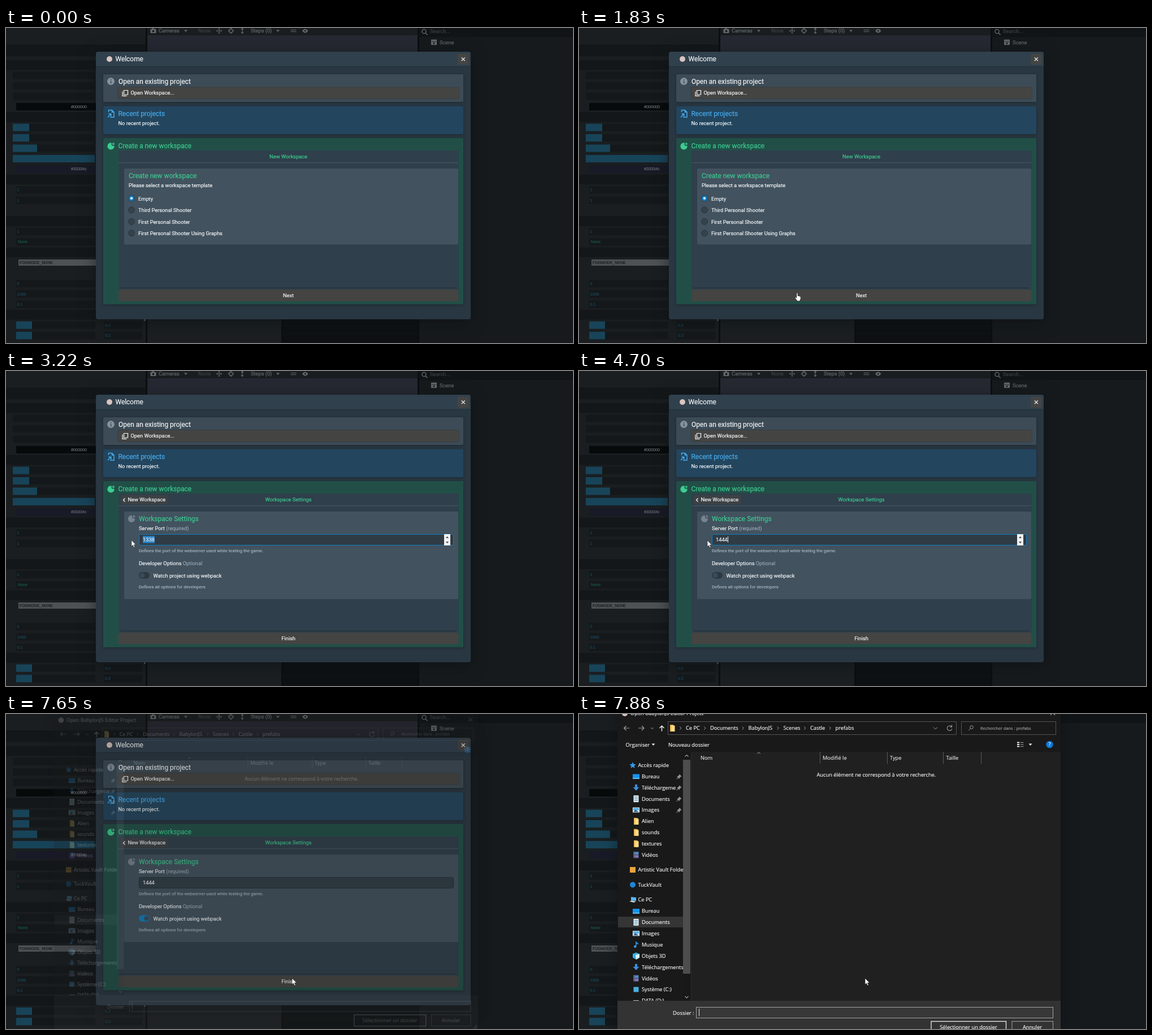
Animation, 1003 px wide and 558 px high, one loop 8000 ms. Source, as an HTML page:

```html
<!DOCTYPE html>
<html lang="en">
<head>
<meta charset="utf-8">
<title>Workspace wizard</title>
<style>
html, body { margin: 0; width: 100%; height: 100%; overflow: hidden; background: #151a1c; }
svg { display: block; width: 100vw; height: 100vh; font-family: Roboto, sans-serif; }
text { white-space: pre; }
.gui { font-family: "Liberation Sans", Arial, sans-serif; }
#picker text { font-family: "Open Sans", "Noto Sans", sans-serif; }
.lift { filter: drop-shadow(0 1px 2px rgba(16,22,26,.5)); }
.modal { filter: drop-shadow(0 6px 14px rgba(10,14,17,.55)); }
</style>
</head>
<body>
<svg id="stage" viewBox="0 0 1003 558" preserveAspectRatio="none"></svg>
<script>
const LOOP = 8000;
const H = 11.93, B = 9.28, S = 7.96, G = 7.2, W = 9.28;   // text sizes
const WHITE = '#f5f8fa', GREEN = '#3dcc91', BLUE = '#48aff0', MUTED = '#a7b6c2', BTN = '#444443', LOGO = '#d8c4c0';

const rect = (x, y, x2, y2, fill, more = '') =>
  `<rect x="${x}" y="${y}" width="${x2 - x}" height="${y2 - y}" fill="${fill}" ${more}/>`;
// the hairline stroke gives the slightly heavier look of screen text
const text = (x, y, s, size, fill = WHITE, more = '') =>
  `<text x="${x}" y="${y + size * .36}" font-size="${size}" fill="${fill}" stroke="${fill}" stroke-width=".18" ${more}>${s}</text>`;
const muted = s => `<tspan fill="${MUTED}" stroke="none">${s}</tspan>`;
const mid = (x, y, s, size, fill) => text(x, y, s, size, fill, 'text-anchor="middle"');
const line = (d, stroke, w = 1, more = '') =>
  `<path d="${d}" fill="none" stroke="${stroke}" stroke-width="${w}" ${more}/>`;
const shape = (d, fill, more = '') => `<path d="${d}" fill="${fill}" ${more}/>`;
const dot = (x, y, r, fill, more = '') => `<circle cx="${x}" cy="${y}" r="${r}" fill="${fill}" ${more}/>`;
const group = (id, body, more = '') => `<g id="${id}" ${more}>${body}</g>`;
const caretDown = (x, y, fill) => shape(`M${x - 3} ${y - 1.5}h6l-3 3.5z`, fill);
const chevron = (x, y, c) => line(`M${x - 1.3} ${y - 2.7}l2.7 2.7l-2.7 2.7`, c);

// ---- editor behind the dialog
function inspector() {
  const rowY = k => 84 + k * 18.43;
  const field = (k, x, x2, fill = '#14181a') => rect(x, rowY(k) - 6.6, x2, rowY(k) + 6.6, fill);
  const label = (k, x, s, c = '#1a4a5e', size = G) => text(x, rowY(k), s, size, c, 'class="gui"');
  let s = rect(0, 0, 247, 558, '#1a1e20') + rect(0, 29, 247, 50, '#131719');
  for (const k of [-1, 4, 10, 14, 17, 23]) s += rect(0, rowY(k) - 8.7, 247, rowY(k) + 8.7, '#131719');
  for (const k of [0, 1, 2, 5, 6, 7, 8]) s += field(k, 12, 157);
  for (const k of [11, 12, 15, 16, 20, 21, 22, 24, 25]) s += field(k, 18, 158);
  s += field(3, 18, 159, '#070a0b') + label(3, 115, '#000000', '#6b6f71');
  s += field(9, 18, 159, '#181a27') + label(9, 115, '#33334c', '#6b6f71');
  [[5, 41], [6, 41], [7, 55], [8, 157]].forEach(([k, x]) => s += field(k, 12, x, '#184459'));
  [[11, '1'], [12, '1'], [15, '1'], [20, '0'], [21, '1000'], [22, '0.1']].forEach(([k, v]) => s += label(k, 19.5, v));
  s += label(16, 21, 'None', '#1a5a48');
  s += rect(22, 410, 160, 421, '#4e5254') + label(18, 24, 'FOGMODE_NONE', '#171b1d', 6.85);
  for (const k of [24, 25]) s += field(k, 18, 46, '#184459') + field(k, 173, 241) + label(k, 175, '0.2');
  return s + rect(244, 515, 247, 519, '#565a5c');
}

function editor() {
  const c = '#64696c', dim = '#3c4144';
  let s = rect(0, 0, 1003, 558, '#0c0f11') + inspector();
  s += rect(250, 0, 728, 13, '#191d1f') + rect(250, 13, 728, 510, '#262832');
  s += rect(250, 510, 487, 558, '#1b1f22') + rect(490, 510, 728, 558, '#0d1113');
  s += rect(731, 0, 1003, 558, '#161a1d') + rect(731, 0, 1003, 16, '#101417');
  s += rect(255.5, 2, 265.5, 9, c, 'rx="1"') + rect(258, .5, 262, 2, c) + dot(260.5, 5.5, 2, '#191d1f');
  s += text(270, 4.5, 'Cameras', B, c) + caretDown(318, 5, c) + text(340, 4.5, 'None', B, dim);
  s += line('M372.5 5h9M377 .5v9M374 3.5l-1.6 1.5l1.6 1.5M380 3.5l1.6 1.5l-1.6 1.5M375.5 2l1.5-1.6l1.5 1.6M375.5 8l1.5 1.6l1.5-1.6', c);
  s += dot(398, 5, 3.6, 'none', `stroke="${c}" stroke-width="1.2"`) + line('M392.5 5h4M399.5 5h4M398 0v3.5M398 6.5v3.5', c, 1.2);
  s += line('M418 .5v9M416 2.5l2-2l2 2M416 7.5l2 2l2-2', c, 1.2);
  s += text(433, 4.5, 'Steps (0)', B, c) + caretDown(481, 5, c) + line('M503.5 3.5h10M503.5 6.5h10', c);
  s += shape('M524 5q5-7 10.5 0q-5.5 7-10.5 0z', c) + dot(529.2, 5, 1.6, '#191d1f');
  s += dot(739.5, 6, 3.6, 'none', `stroke="${c}" stroke-width="1.3"`) + line('M742 8.7l3.5 3.5', c, 1.6);
  s += text(750, 6, 'Search...', B, dim);
  s += rect(752, 22, 762, 30, c, 'rx=".8"') + rect(752, 20.5, 762, 23, c) + line('M753 24h8', '#161a1d', .8) + dot(757, 27, 1.5, '#161a1d');
  return s + text(767, 25.5, 'Scene', B, c);
}

// ---- welcome dialog
const globe = (x, y, c, bg) => dot(x, y + .4, 6.1, c) + dot(x + 4.3, y - 3.6, 3.4, bg) +
  line(`M${x + 4.3} ${y - 6.2}v5M${x + 1.8} ${y - 3.7}h5`, c, 1.3);

function welcome() {
  let s = rect(159, 42, 822, 516, '#293742', 'rx="4" class="modal"');
  s += shape('M159 68v-22q0-4 4-4h655q4 0 4 4v22z', '#30404d') + line('M159 68.4h663', '#222d36', .9);
  s += dot(183, 55, 5, LOGO) + text(193.5, 54.5, 'Welcome', H);
  s += rect(799, 45.5, 818.5, 65, BTN, 'rx="2"') + line('M805.8 52.2l6 6M811.8 52.2l-6 6', '#d5dce1', 1.5);

  s += rect(172, 82, 809, 131, '#3c4b56', 'rx="2" class="lift"') + dot(185.5, 94.5, 6.4, '#8593a0');
  s += rect(184.8, 93.5, 186.4, 98.3, '#3c4b56') + rect(184.8, 90.7, 186.4, 92.3, '#3c4b56');
  s += text(199, 94.5, 'Open an existing project', H) + rect(198, 104.5, 801.5, 125.5, BTN, 'rx="2" stroke="#333b40" stroke-width=".7"');
  s += line('M208.5 110.5h7v7.5h-7z', WHITE, 1.2) + line('M206 112.5v7.8h7.5', WHITE, 1.2);
  s += text(220.5, 114.8, 'Open Workspace...', B);

  s += rect(172, 138.5, 809, 188, '#23455e', 'rx="2" class="lift"');
  s += line('M181.5 149v-3.5h6l3.5 3.5v9h-7M187.5 145.5v3.5h3.5', BLUE, 1.4) + line('M180 158l5.5-5.5M181.5 152.3h4.2v4.2', BLUE, 1.5);
  s += text(198.5, 151.8, 'Recent projects', H, BLUE) + text(198.5, 168.4, 'No recent project.', B);

  s += rect(172, 195, 809, 489.5, '#214f47', 'rx="2" class="lift"') + globe(185.5, 209, GREEN, '#214f47');
  s += text(198.5, 208.7, 'Create a new workspace', H, GREEN);
  s += rect(199, 217, 800.5, 484, '#2f3f4b') + line('M199 238.7h601', '#4a5a66', 1);
  s += line('M203 460.5h594', '#212b33', 1) + rect(199, 463.5, 800.5, 484, BTN, 'rx="2"');
  return s + pageOne() + pageTwo();
}

function pageOne() {
  let s = mid(499.5, 228, 'New Workspace', B, GREEN) + rect(209, 249, 800, 383.5, '#42525f', 'rx="2"');
  s += text(217, 261.7, 'Create new workspace', H, GREEN) + text(217, 278.5, 'Please select a workspace template', B);
  ['Empty', 'Third Personal Shooter', 'First Personal Shooter', 'First Personal Shooter Using Graphs'].forEach((name, i) => {
    const y = 301.7 + i * 20.55;
    s += dot(222, y, 5.5, i ? '#34424d' : '#137cbd', 'stroke="#25313a" stroke-width=".8"');
    if (!i) s += dot(222, y, 2.1, '#fff');
    s += text(234, y + .5, name, B);
  });
  return group('one', s + mid(499.5, 474, 'Next', B));
}

function pageTwo() {
  let s = rect(203, 220, 287, 236.5, '#3c4144', 'rx="2"') + line('M210.5 225.5l-3 3l3 3', WHITE, 1.3);
  s += text(215.5, 228, 'New Workspace', B) + mid(499.5, 228, 'Workspace Settings', B, GREEN);
  s += rect(209, 249, 800, 404, '#42525f', 'rx="2"') + globe(222, 261.5, '#75848f', '#42525f');
  s += text(235, 261.7, 'Workspace Settings', H, GREEN);
  s += text(235, 278.7, 'Server Port ' + muted('(required)'), B);
  s += rect(235.5, 289.5, 791.5, 308.5, '#2f3c46', 'id="field" rx="2"') + rect(242, 292, 242, 305, '#2a7fc0', 'id="marked"');
  s += text(242, 298.5, '', B, WHITE, 'id="port"') + rect(0, 293, .9, 304, WHITE, 'id="caret"');
  s += group('spin', rect(775, 289, 786, 309, '#f2f2f2') + shape('M778 296h5l-2.5-3zM778 302.2h5l-2.5 3z', '#444'));
  s += text(235, 318.3, 'Defines the port of the webserver used while testing the game.', S, MUTED);
  s += text(235, 341, 'Developer Options ' + muted('Optional'), B);
  s += rect(235, 356.2, 254, 367.8, '#2c3943', 'id="pill" rx="5.8"') + dot(241, 362, 4.3, '#3b4b58', 'id="knob"');
  s += text(260.5, 362.7, 'Watch project using webpack', B) + text(235, 382.3, 'Defines all options for developers', S, MUTED);
  return group('two', s + mid(499.5, 474, 'Finish', B));
}

// ---- folder picker
const icons = {
  star: (x, y) => shape(`M${x} ${y - 5.5}l1.6 3.8l4 .4l-3 2.7l.9 4l-3.5-2.1l-3.5 2.1l.9-4l-3-2.7l4-.4z`, '#2f9bf0'),
  desk: (x, y) => rect(x - 6, y - 4, x + 6, y + 4.5, '#1493ec') + rect(x - 6, y + 3, x + 6, y + 4.5, '#7cc8ff'),
  down: (x, y) => shape(`M${x - 2} ${y - 5.5}h4v5h3.5l-5.5 6l-5.5-6h3.5z`, '#3b8fe0'),
  doc: (x, y) => rect(x - 4.5, y - 6, x + 4.5, y + 6, '#e8eef2') + line(`M${x - 3} ${y - 3}h6M${x - 3} ${y}h6M${x - 3} ${y + 3}h6`, '#4f97c4', 1.2),
  pic: (x, y) => rect(x - 6, y - 4.5, x + 6, y + 4.5, '#e4edf3') + rect(x - 5, y - 3.5, x + 5, y + .5, '#55aee6') + shape(`M${x - 5} ${y + 3.5}l3.5-4l3 2l3.5 2z`, '#34577c'),
  folder: (x, y) => shape(`M${x - 4} ${y - 6}h5l3 1.5v10.5h-8z`, '#e9bb58') + rect(x - 1.5, y - 4, x + 4.5, y + 6, '#ffdc86'),
  film: (x, y) => rect(x - 5, y - 6, x + 5, y + 6, '#37404b') + rect(x - 2.5, y - 5, x + 4, y - .5, '#4b8fd6') + rect(x - 2.5, y + .5, x + 4, y + 5, '#8a6fc0') + line(`M${x - 3.8} ${y - 5}v10`, '#cfd6dd', 1, 'stroke-dasharray="1.2 1.2"'),
  pc: (x, y) => shape(`M${x - 3} ${y - 5}l9 1v6l-9-.5z`, '#58b7f2') + shape(`M${x - 6} ${y + 3}l4-1.5l8 1.5l-4 2z`, '#c8d3da'),
  note: (x, y) => line(`M${x} ${y + 3}v-8q1 3 4 4`, '#2f9bf0', 1.6) + dot(x - 1.8, y + 3.4, 2.2, '#2f9bf0'),
  cube: (x, y) => shape(`M${x - 6} ${y - 3.5}l6-2.5l6 2.5v6.5l-6 3.5l-6-3.5z`, '#38b0e4') + shape(`M${x - 1} ${y - 1.5}l7-2v6.5l-6 3.5z`, '#d9f1fb'),
  round: (x, y) => dot(x, y, 5, '#1c86d8'),
  square: (x, y) => rect(x - 5, y - 5, x + 5, y + 5, '#e8a33d'),
  disk: (x, y) => rect(x - 4.5, y - 4.5, x + 4.5, y + 4.5, '#4aaee0'),
  drive: (x, y) => rect(x - 5, y - 1, x + 5, y + 4, '#b8bec3')
};

const places = [
  ['star', 'Accès rapide', 90.5, 0], ['desk', 'Bureau', 110.5, 1], ['down', 'Téléchargeme', 130.3, 1], ['doc', 'Documents', 150.2, 1],
  ['pic', 'Images', 170, 1], ['folder', 'Alien', 190, 1], ['folder', 'sounds', 209.8, 1], ['folder', 'textures', 229.7, 1],
  ['film', 'Vidéos', 249.5, 1], ['square', 'Artistic Vault Folders', 276, 0], ['round', 'TuckVault', 302.5, 0], ['pc', 'Ce PC', 329, 0],
  ['desk', 'Bureau', 349, 1], ['doc', 'Documents', 368.8, 1], ['pic', 'Images', 388.7, 1], ['note', 'Musique', 408.5, 1],
  ['cube', 'Objets 3D', 428.4, 1], ['down', 'Téléchargements', 448.3, 1], ['film', 'Vidéos', 468.2, 1],
  ['disk', 'Système (C:)', 488, 1], ['drive', 'DATA (D:)', 508, 1]
];

function picker() {
  const c = '#f4f4f4', grey = '#a0a0a0';
  let s = rect(68, -18, 852, 572, '#191919', 'class="modal"') + rect(199, 67, 852, 508, '#202020');
  s += dot(81, -1, 5, LOGO) + text(91, -1, 'Open BabylonJS Editor Project', W, c) + line('M834 -6l8 8M842 -6l-8 8', c);
  s += line('M89.5 25h-10M83.5 21l-4 4l4 4M105 25h10M111 21l4 4l-4 4', grey, 1.2) + line('M127 24l2.5 2.5l2.5-2.5', grey);
  s += line('M146.5 30.5v-9.5M142.5 25l4-4l4 4', c, 1.4);
  s += rect(157.5, 13.5, 667.5, 36.5, '#191919', 'stroke="#535353"') + icons.folder(165, 25);
  [['Ce PC', 189], ['Documents', 232], ['BabylonJS', 299.5], ['Scenes', 361.5], ['Castle', 409], ['prefabs', 453.5]]
    .forEach(([name, x]) => s += chevron(x - 9.5, 25, grey) + text(x, 25, name, W, c));
  s += line('M627 23.5l3.5 3.5l3.5-3.5', grey) + line('M659 22.5a4.3 4.3 0 1 0 .8 3.5M659.5 19.5v3.5h-3.5', grey, 1.1);
  s += rect(676.5, 13.5, 843.5, 36.5, '#191919', 'stroke="#535353"') + dot(694.5, 23.5, 2.8, 'none', `stroke="${grey}"`) + line('M692.5 25.5l-3 3.5', grey);
  s += text(710, 25, 'Rechercher dans : prefabs', 7.4, grey);
  s += group('tools', text(82.5, 54.5, 'Organiser', W, c) + caretDown(131.5, 54, c) + text(158, 54.5, 'Nouveau dossier', W, c) +
    line('M775 50.5h4M775 54h4M775 57.5h4', c, 2) + line('M780.5 50.5h6M780.5 54h6M780.5 57.5h6', grey) + caretDown(798.5, 54, c));
  s += dot(832.5, 54, 6.3, '#0f78d4') + mid(832.5, 54, '?', 9, '#fff');
  [426, 545, 644, 711].forEach(x => s += line(`M${x}.5 67v21`, '#5a5a5a'));
  [['Nom', 215], ['Modifié le', 431], ['Type', 550], ['Taille', 649.5]].forEach(([name, x]) => s += text(x, 78, name, W, '#dedede'));
  s += line('M315 70.5l3-2.5l3 2.5', grey) + text(420.5, 108, 'Aucun élément ne correspond à votre recherche.', W, c);

  s += rect(69, 359, 184, 378, '#353535');
  let list = '';
  for (const [kind, name, y, deep] of places)
    list += icons[kind](deep ? 101 : 95, y) + text(deep ? 111 : 104.5, y, name, W, c);
  s += `<g clip-path="url(#side)">${list}</g>` + rect(171, 122, 184, 139, '#191919');
  for (const y of [110.5, 130.3, 150.2, 170])
    s += shape(`M177.5 ${y - 4}l4 4l-1.5 .4l-2 2l-.4 2l-2-2l-2.8 2.8l-.6-.6l2.8-2.8l-1.8-1.8l2-.6l2-2z`, '#8f979d');
  s += rect(184, 67, 198, 508, '#181818') + rect(184, 81, 197, 460, '#4d4d4d') + line('M198.5 67v441', '#2d2d2d');
  s += line('M187.5 75.5l3-3l3 3M187.5 500l3 3l3-3', grey, 1.2);

  s += rect(68, 508, 852, 572, '#333') + text(203.5, 529.5, 'Dossier :', W, c, 'text-anchor="end"');
  s += rect(207.5, 519.5, 838.5, 538.5, '#383838', 'stroke="#a3a3a3"') + line('M212.5 522v13', c, .9);
  s += rect(623, 544.5, 755.5, 565.5, '#333', 'stroke="#e2e2e2" stroke-width="1.4"') + mid(689, 554.5, 'Sélectionner un dossier', W, c);
  s += rect(766, 544.5, 838.5, 565.5, '#333', 'stroke="#a0a0a0"') + mid(802, 554.5, 'Annuler', W, c);
  return group('picker', s + shape('M850 562v8h-8z', '#777'));
}

// ---- mouse pointers, hot spot at 0,0
const pointers =
  group('arrow', shape('M0 0v11.2l2.5-2.3l1.8 4.1l1.9-.8l-1.8-4h3.5z', '#fff', 'stroke="#111" stroke-width=".6"')) +
  group('hand', shape('M-1.2 1.2q1.2-2.2 2.3 0v4.3q1.3-.7 1.9 .4q1.3-.6 1.8 .5q1.4-.3 1.4 1.3v3l-1.2 2.6v1.5h-5.6v-1.2l-3.4-4.5q-.6-1.7 1.2-1.3l1.6 1.5z', '#fff', 'stroke="#111" stroke-width=".7"')) +
  group('beam', line('M-2.5-5.5h1.8l.7 .7l.7-.7h1.8M0-5v10M-2.5 5.5h1.8l.7-.7l.7 .7h1.8', '#dfe5e9', .9));

const $ = id => document.getElementById(id);
$('stage').innerHTML = '<defs><clipPath id="side"><rect x="68" y="67" width="116" height="441"/></clipPath></defs>' +
  editor() + welcome() + picker() + group('mouse', pointers);

// ---- timing: bursts of [start, end, steps]; the picture rests between steps
const bursts = [[0], [130, 910, 11], [990, 1590, 9], [1760, 2520, 11], [2600, 3290, 10], [4000], [4300], [4470], [4700],
  [5160, 5770, 9], [6170, 6950, 11], [7020, 7100, 2], [7480, 7880, 6]];
const path = [[130, 886, 548], [400, 610, 432], [650, 372, 342], [910, 265, 314], [990, 264, 316], [1200, 298, 368], [1590, 386, 469],
  [1910, 386, 469], [2290, 380, 464], [2520, 322, 374], [2830, 268, 300], [2990, 266, 299], [3140, 217, 299], [3290, 227, 300],
  [5090, 227, 300], [5770, 250, 364], [6170, 251, 364], [6482, 303, 365], [6950, 521, 477], [7020, 512, 472], [7100, 506, 468]];

function snap(t) {
  const [a, b = a, n = 1] = bursts.filter(s => s[0] <= t).pop();
  if (n < 2) return a;
  const dt = (b - a) / (n - 1);
  return a + dt * Math.min(n - 1, Math.floor((t - a + 8) / dt));
}

function pointerAt(t) {
  const i = path.findIndex(p => p[0] > t);
  if (i < 0) return path[path.length - 1].slice(1);
  const [t0, x0, y0] = path[Math.max(0, i - 1)], [t1, x1, y1] = path[i];
  const k = t1 > t0 ? (t - t0) / (t1 - t0) : 0;
  return [x0 + (x1 - x0) * k, y0 + (y1 - y0) * k];
}

function pointerKind(x, y, t, second) {
  const within = (a, b, c, d) => x >= a && x <= c && y >= b && y <= d;
  if (t >= 7480) return 'arrow';
  if (within(199, 463, 800, 484)) return 'hand';
  if (!second) return within(209, 293, 800, 373) ? 'hand' : 'arrow';
  if (within(235, 355, 792, 370)) return 'hand';
  return within(235, 289, 775, 309) ? 'beam' : 'arrow';
}

const show = (id, on) => $(id).setAttribute('visibility', on ? 'inherit' : 'hidden');
const set = (id, name, v) => $(id).setAttribute(name, v);
const clamp = v => Math.max(0, Math.min(1, v));

function draw(time) {
  const t = snap(time), [x, y] = pointerAt(t);
  const second = t >= 1900, focus = t >= 2960 && t < 6160;
  show('one', !second);
  show('two', second);

  const port = t < 4000 ? '1338' : '1444'.slice(0, 1 + (t >= 4300) + (t >= 4470) + (t >= 4700));
  $('port').textContent = port;
  set('field', 'stroke', focus ? '#137cbd' : '#232e37');
  show('spin', second && focus);
  const from = Math.max(242, Math.min(263, x));
  set('marked', 'x', from);
  set('marked', 'width', focus && t < 4000 ? 263 - from : 0);
  show('caret', second && focus && t >= 4000 && (t < 5160 || t >= 5690));
  set('caret', 'x', 242.2 + port.length * 5.21);

  const on = clamp((t - 6120) / 100);
  set('pill', 'fill', on ? '#137cbd' : '#2c3943');
  set('knob', 'cx', 241 + 7.5 * on);

  const p = clamp((t - 7540) / 340), scale = 1 - .087 * (1 - p) ** 2;
  show('picker', p > 0);
  show('tools', t >= 7700);
  set('picker', 'opacity', p * p * (3 - 2 * p));
  set('picker', 'transform', `translate(460 275) scale(${scale}) translate(-460 -275)`);

  const kind = pointerKind(x, y, t, second);
  show('mouse', t >= 130);
  for (const id of ['arrow', 'hand', 'beam']) show(id, id === kind);
  set('mouse', 'transform', `translate(${x} ${y})`);
}

const start = performance.now();
function tick() {
  draw((performance.now() - start) % LOOP);
  requestAnimationFrame(tick);
}
tick();
</script>
</body>
</html>
```
